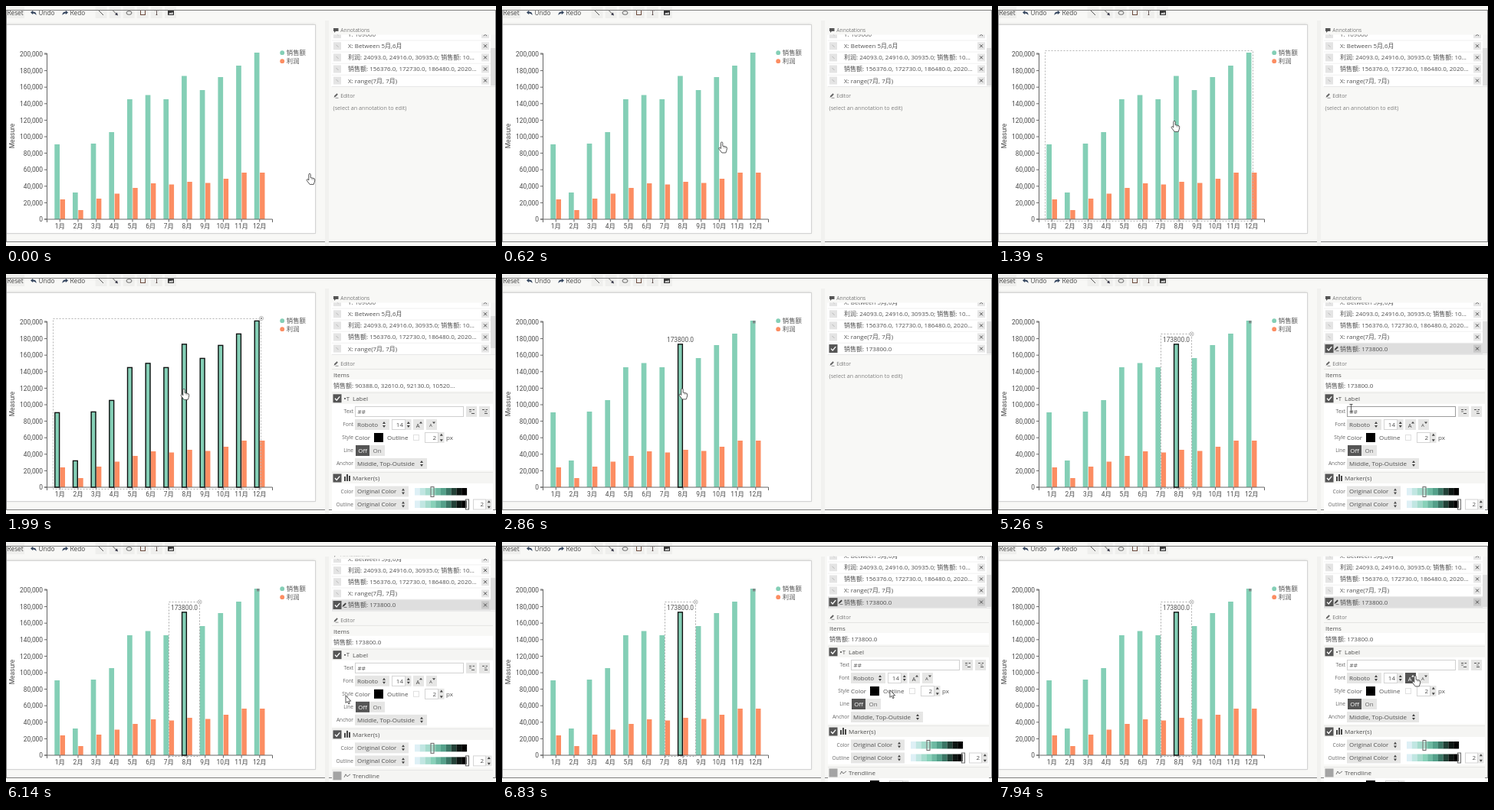
Write an HTML page with a canvas that moves like this. It is 639 by 314 pixels and loops after 8 s.

```html
<!DOCTYPE html>
<html lang="zh">
<head>
<meta charset="utf-8">
<title>Chart annotation</title>
<style>
html, body { margin: 0; width: 100%; height: 100%; overflow: hidden; background: #f8f8f6; }
canvas { display: block; width: 639px; height: 314px; }
</style>
</head>
<body>
<canvas id="stage"></canvas>
<script>
const W = 639, H = 314, LOOP = 8000;
const canvas = document.getElementById('stage');
const dpr = window.devicePixelRatio || 1;
canvas.width = W * dpr;
canvas.height = H * dpr;
const c = canvas.getContext('2d');

const UI = '"Open Sans", "Noto Sans CJK SC", "Noto Sans CJK", sans-serif';
const PLOT = 'Roboto, "Noto Sans CJK SC", "Noto Sans CJK", sans-serif';
const TEAL = '#84cfb6', ORANGE = '#fc8d62', DARK = '#555', BG = '#f8f8f6', BUTTON = '#e6e6e5';

// Bar tops in pixels, one per month
const salesTop = [181, 244, 180, 165, 122, 116.5, 122, 91.5, 110, 93, 78, 61];
const profitTop = [253, 267, 252, 245.5, 238, 232, 233.5, 230, 231.5, 226, 218, 218];
const BASE = 279, STEP = 23.68;

const rows = ['Y: 109000', 'X: Between 5月,6月', '利润: 24093.0, 24916.0, 30935.0; 销售额: 10...',
  '销售额: 156376.0, 172730.0, 186480.0, 2020...', 'X: range(7月, 7月)', '销售额: 173800.0'];

// Pointer path: time, x, y
const path = [[0, 396, 219], [130, 396, 219], [900, 240, 160], [970, 240, 160], [1390, 230, 150],
  [1660, 232, 150], [2650, 232, 150], [2860, 235, 149.5], [3260, 235, 149.5], [3800, 588, 84],
  [4030, 572.5, 99.5], [4490, 572.5, 99.5], [5260, 460.5, 175], [5390, 460.5, 175], [6140, 443, 201],
  [6210, 443, 201], [6970, 512, 193], [7040, 512, 193], [7390, 521, 176], [7590, 521, 176],
  [7940, 544, 174.5], [LOOP, 544, 174.5]];

const clamp = v => Math.max(0, Math.min(1, v));
const smooth = v => v * v * (3 - 2 * v);
const between = (t, a, b) => t >= a && t < b;

function pointer(t) {
  let i = 1;
  while (i < path.length - 1 && t >= path[i][0]) i++;
  const [t0, x0, y0] = path[i - 1], [t1, x1, y1] = path[i];
  const k = smooth(clamp((t - t0) / (t1 - t0)));
  return { x: x0 + (x1 - x0) * k, y: y0 + (y1 - y0) * k };
}

function rect(x, y, w, h, fill, stroke) {
  if (fill) { c.fillStyle = fill; c.fillRect(x, y, w, h); }
  if (stroke) {
    c.strokeStyle = stroke;
    c.lineWidth = 1;
    c.strokeRect(x + .5, y + .5, w - 1, h - 1);
  }
}

function text(s, x, y, size = 8, color = '#505050', align = 'left', font = UI) {
  c.font = size + 'px ' + font;
  c.fillStyle = color;
  c.textAlign = align;
  c.fillText(s, x, y + size * .37);
}

function line(points, color = '#444', width = 1) {
  c.beginPath();
  for (let i = 0; i < points.length; i += 2) c.lineTo(points[i], points[i + 1]);
  c.strokeStyle = color;
  c.lineWidth = width;
  c.stroke();
}

function dot(x, y, r, fill, stroke) {
  c.beginPath();
  c.arc(x, y, r, 0, 7);
  if (fill) { c.fillStyle = fill; c.fill(); }
  if (stroke) { c.strokeStyle = stroke; c.lineWidth = .8; c.stroke(); }
}

function shape(d, fill, stroke, width = 1) {
  const p = new Path2D(d);
  if (fill) { c.fillStyle = fill; c.fill(p); }
  if (stroke) { c.strokeStyle = stroke; c.lineWidth = width; c.stroke(p); }
}

function at(x, y, draw) {
  c.save();
  c.translate(x, y);
  draw();
  c.restore();
}

function cross(x, y, r, color, width = 1) {
  line([x - r, y - r, x + r, y + r], color, width);
  line([x - r, y + r, x + r, y - r], color, width);
}

function dashed(x, y, w, h, color) {
  c.setLineDash([2, 2]);
  rect(x, y, w, h, null, color);
  c.setLineDash([]);
}

function closeMark(x, y) {
  dot(x, y, 2.6, '#fff', '#aaa');
  cross(x, y, 1, '#777', .8);
}

function toolbar() {
  rect(0, 1, 24, 15, '#efefed');
  text('Reset', 1.5, 8.7, 8.2, '#444');
  text('Undo', 42.5, 8.7, 8.2, '#444');
  text('Redo', 83.5, 8.7, 8.2, '#444');
  const arrow = 'M0 3.5L3.2 .8V2.6Q7.5 2.6 7.6 7Q6 4.4 3.2 4.4V6.2Z';
  at(32, 5, () => shape(arrow, '#34455e'));
  at(81, 5, () => { c.scale(-1, 1); shape(arrow, '#34455e'); });
  for (let i = 0; i < 6; i++) rect(116.5 + i * 18.1, 1, 15, 15, '#efefed');
  line([121, 6, 127, 12], '#444', .9);
  line([139, 5.5, 144, 10.5], '#444', .9);
  shape('M146 12.5L142 11.2L144.8 8.4Z', '#334');
  c.beginPath();
  c.ellipse(160.5, 9, 3.5, 2.3, 0, 0, 7);
  c.strokeStyle = '#555';
  c.stroke();
  rect(175, 5, 7, 7, null, '#6b4a3c');
  text('T', 196.5, 8.8, 8, '#433', 'center', '"Noto Serif", serif');
  rect(211, 5, 8, 7, '#333');
  shape('M212 11L214 8.5L215.5 9.8L217 7.5L218 11Z', '#ddd');
}

function axes() {
  const ink = '#666';
  line([50, 62, 53.5, 62, 53.5, BASE, 50, BASE], ink);
  line([53.5, 283, 53.5, BASE, 347.5, BASE, 347.5, 283], ink);
  for (let i = 0; i <= 10; i++) {
    const y = BASE - i * 21.6;
    line([50, y, 53.5, y], ink);
    text((i * 20000).toLocaleString('en-US'), 48, y, 8.4, '#4a4a4a', 'right', PLOT);
  }
  for (let i = 0; i < 12; i++) {
    const x = 70.3 + i * STEP;
    line([x, BASE, x, 282.5], ink);
    text(i + 1 + '月', x, 287.5, 8.4, '#4a4a4a', 'center', PLOT);
  }
  at(8, 170, () => {
    c.rotate(-Math.PI / 2);
    text('Measure', 0, 0, 8.4, '#4a4a4a', 'center', PLOT);
  });
}

function chart(s) {
  c.save();
  c.shadowColor = 'rgba(0,0,0,.18)';
  c.shadowBlur = 3 * dpr;
  rect(-2, 24, 405, 273, '#fff');
  c.restore();
  rect(-2, 24, 406, 274, null, '#d4d4d4');
  for (let i = 0; i < 12; i++) {
    const x = 63.3 + i * STEP;
    rect(x, salesTop[i], 6.7, BASE - salesTop[i], TEAL);
    rect(x + 7.3, profitTop[i], 6.4, BASE - profitTop[i], ORANGE);
  }
  axes();
  for (let i = 0; i < 12; i++) {
    if (!s.series && !(s.single && i === 7)) continue;
    c.strokeStyle = '#111';
    c.lineWidth = 1.4;
    c.strokeRect(63.8 + i * STEP, salesTop[i] + .4, 5.8, BASE - salesTop[i] - .4);
  }
  dot(360.2, 61.2, 2.9, TEAL);
  dot(360.2, 72.2, 2.9, ORANGE);
  text('销售额', 365.8, 61.2, 8.4, '#555', 'left', PLOT);
  text('利润', 365.8, 72.2, 8.4, '#555', 'left', PLOT);

  if (s.hover || s.series) dashed(61, 58, 272, 224, '#b4b4b4');
  if (s.series) closeMark(333, 58);
  if (s.single) {
    rect(327, 61, 3.5, 3.5, '#7c8a88');
    text('173800.0', 232.5, 85.5, 8.4, '#555', 'center', PLOT);
  }
  if (s.boxed) {
    dashed(212, 78, 41, 203, '#aaa');
    closeMark(252.5, 78.5);
  }
}

function check(x, y, on = true) {
  rect(x - .5, y - .5, 11, 11, on ? DARK : '#a4a4a4');
  if (on) line([x + 2, y + 5, x + 4.2, y + 7.4, x + 8.2, y + 2.6], '#fff', 1.3);
}

function pencil(x, y, color) {
  shape(`M${x} ${y + 5}L${x + 1} ${y + 2.5}L${x + 4} ${y - .5}L${x + 5.4} ${y + .9}L${x + 2.4} ${y + 4}Z`, color);
  line([x + 2, y + 5.5, x + 6, y + 5.5], color, .7);
}

function list(s) {
  rect(427, 29, 6.5, 4, '#555');
  shape('M428 32.5V35L430.5 32.5Z', '#555');
  text('Annotations', 436.3, 31.4, 6.7, '#777');
  c.save();
  c.beginPath();
  c.rect(424, 37.5, 214, 67.5);
  c.clip();
  rect(424, 37, 209, 69, '#fff');
  rows.forEach((label, i) => {
    const y = 37.2 + (i - (s.single ? 1 : 0)) * 15.1, active = s.boxed && i === 5;
    if (active) rect(425, y - 7, 207, 15, s.rowHover ? '#cfcfcf' : '#dedede');
    line([425, y + 7.8, 632, y + 7.8], '#f0f0f0');
    if (i === 5) check(427, y - 5);
    else {
      rect(427, y - 5, 10, 10, '#e4e4e4');
      line([430.5, y - 1.5, 433.5, y + 1.5], '#aaa', .8);
    }
    if (active) pencil(438.5, y - 2.5, '#444');
    text(label, 446, y);
    rect(620, y - 5, 10, 10, active ? '#c8c8c8' : '#e6e6e6');
    cross(625, y, 2, '#4a4a4a', .95);
  });
  rect(632, 37, 6, 69, '#f5f5f4');
  if (s.single) rect(632, 62, 6, 42, '#dedede');
  else rect(632, 55, 6, s.series ? 42 : 49, '#dedede');
  c.restore();
  line([425, 105.5, 638, 105.5], '#e8e8e8');
}

function spin(x, y, gap = 1) {
  shape(`M${x - 2} ${y - gap}h4l-2 -3zM${x - 2} ${y + gap}h4l-2 3z`, '#444');
}

function select(label, x, y, w) {
  rect(x, y - 7, w, 14, BUTTON);
  text(label, x + 3, y);
  spin(x + w - 7, y);
}

function number(v, x, y, w, gap = 2.3) {
  rect(x, y - 7, w, 14, '#fff', '#d4d4d4');
  text(v, x + w - 3, y, 8, '#505050', 'right');
  rect(x + w, y - 7, 7.5, 14, BUTTON);
  spin(x + w + 3.8, y, gap);
}

const caption = (s, y) => text(s, 453, y, 6.6, '#666', 'right');

function head(label, y, on) {
  rect(425, y - 8, 210, 15, '#f5f5f3');
  line([425, y - 7.5, 635, y - 7.5], '#e6e6e4');
  check(427, y - 5, on);
  text(label, 452, y);
}

const ramp = [[0, 222, 240, 246], [.35, 132, 207, 182], [.6, 74, 150, 128], [.85, 18, 30, 26], [1, 0, 0, 0]];

function shade(k) {
  let i = 1;
  while (k > ramp[i][0]) i++;
  const a = ramp[i - 1], b = ramp[i], f = (k - a[0]) / (b[0] - a[0]);
  return 'rgb(' + [1, 2, 3].map(j => Math.round(a[j] + (b[j] - a[j]) * f)) + ')';
}

function slider(y, knob) {
  for (let i = 0; i < 10; i++) rect(533 + i * 6.8, y - 5, 6.9, 9.5, shade(i / 9));
  rect(knob, y - 7, 5, 14, 'rgba(255,255,255,.35)', '#666');
}

function fontButton(x, up, dark) {
  rect(x, 190, 14, 14, dark ? DARK : BUTTON);
  const ink = dark ? '#fff' : '#444';
  text('A', x + 6, 198, up ? 7.5 : 6, ink, 'center');
  shape(up ? `M${x + 8} 195.5h4l-2 -2.5z` : `M${x + 8} 193.5h4l-2 2.5z`, ink);
}

function decimalButton(x, indent) {
  rect(x, 173, 14, 14, BUTTON);
  line([x + 4, 177.5, x + 7, 177.5], '#555');
  line([x + 8.5, 177.5, x + 11, 177.5], '#555');
  line([x + 4 + indent, 180, x + 7 + indent, 180], '#777');
  line([x + 7, 182.5, x + 11, 182.5], '#555');
}

function editor(s) {
  pencil(427.5, 114.8, '#666');
  text('Editor', 436.3, 117.8, 6.7, '#777');
  if (!s.editing) {
    text('(select an annotation to edit)', 426.5, 133.8, 7.2, '#808080');
    return;
  }
  rect(425, 124, 210, 240, '#fff');
  rect(425, 124, 210, 14, BG);
  line([425, 124.5, 635, 124.5], '#e4e4e2');
  text('Items', 427, 131.7);
  text(s.series ? '销售额: 90388.0, 32610.0, 92130.0, 10520...' : rows[5], 427, 145.7);

  rect(425, 153, 210, 3, BG);
  head('Label', 162.8, true);
  dot(442, 163, 1, '#444');
  text('T', 444, 163, 7, '#444');
  caption('Text', 180);
  rect(455, 173, 142, 14, '#fff', s.typing ? '#9c9c9c' : '#d0d0d0');
  text('##', 458.5, 180);
  decimalButton(600, 0);
  decimalButton(617, 3);

  caption('Font', 197);
  select('Roboto', 455, 197, 45);
  number('14', 503, 197, 18, 1);
  fontButton(531, true, s.grow);
  fontButton(548, false, false);

  caption('Style', 214);
  text('Color', 455, 214);
  rect(480, 208, 12, 12, '#000');
  text('Outline', 497, 214);
  rect(531, 210, 8, 8, '#fff', '#e0e0e0');
  number('2', 546, 214, 18);
  text('px', 574, 214);

  caption('Line', 231);
  rect(456, 224, 18, 14, DARK);
  rect(474, 224, 20, 14, BUTTON);
  text('Off', 465, 231, 8, '#fff', 'center');
  text('On', 484, 231, 8, '#666', 'center');
  caption('Anchor', 248);
  select('Middle, Top-Outside', 455, 248, 94);

  rect(425, 257, 210, 3, BG);
  head('Marker(s)', 267, true);
  rect(441, 265, 2, 6, '#444');
  rect(444, 262, 2, 9, '#444');
  rect(447, 264, 2, 7, '#444');
  caption('Color', 284.5);
  select('Original Color', 455, 284.5, 70);
  slider(285, 553.5);
  caption('Outline', 301.5);
  select('Original Color', 455, 301.5, 70);
  slider(301.5, 599);
  number('2', 609, 301.5, 17);

  rect(425, 310, 210, 3, BG);
  head('Trendline', 321, false);
  line([441, 323, 443, 319, 445, 322, 449, 319], '#666', .9);
  caption('Line', 338);
  text('Color', 455, 338);
  rect(480, 331, 12, 12, '#000');
  number('2', 505, 338, 18);
}

function panel(s) {
  rect(416, 19, 5, 295, '#f1f1ef');
  c.save();
  c.beginPath();
  c.rect(421, 18.5, 218, 296);
  c.clip();
  c.translate(0, -s.scroll);
  list(s);
  editor(s);
  c.restore();
}

function frameLines() {
  rect(0, 5, 639, 304, null, '#808080');
}

const cursors = {
  hand() {
    shape('M-1.2 9V1.6Q-1.2 .4 0 .4Q1.2 .4 1.2 1.6V5.6L5 6.4Q7 6.8 6.8 8.6L6.2 11.6L5.2 14.4H.2' +
      'L-3.4 9.8Q-4.4 8.2 -3.2 7.6Q-2.3 7.4 -1.2 9Z', '#fff', '#444', .9);
    line([3, 6.2, 3, 8.6], '#777', .6);
    line([5, 6.6, 5, 8.8], '#777', .6);
  },
  arrow() {
    shape('M0 0V9.6L2.2 7.6L3.8 11L5.3 10.3L3.8 7.1H6.8Z', '#fff', '#444', .9);
  },
  beam() {
    line([0, -4.5, 0, 5], '#444', .9);
    line([-2, -4.5, 2, -4.5], '#444', .9);
    line([-2, 5, 2, 5], '#444', .9);
  }
};

function cursorKind(t, p) {
  if (t < 4490) return 'hand';
  if (t < 5390) return p.y < 105 ? 'hand' : p.y > 171 ? 'beam' : 'arrow';
  if (t < 6210) return p.x > 455 && p.y < 187 ? 'beam' : 'arrow';
  return t > 7590 && p.x > 530 ? 'hand' : 'arrow';
}

function draw(t) {
  const p = pointer(t), kind = cursorKind(t, p);
  const s = {
    hover: between(t, 640, 1050) || between(t, 1180, 1925),
    series: between(t, 1925, 2700),
    single: t >= 2700,
    boxed: t >= 4000,
    rowHover: between(t, 4000, 5390) && kind === 'hand',
    typing: kind === 'beam',
    grow: t > 7590 && p.x > 530,
    scroll: 19 * (1 - (1 - clamp((t - 5980) / 400)) ** 3.1)
  };
  s.editing = s.series || t >= 4165;
  c.setTransform(dpr, 0, 0, dpr, 0, 0);
  rect(0, 0, W, H, BG);
  toolbar();
  chart(s);
  frameLines();
  panel(s);
  at(p.x, p.y, cursors[kind]);
}

const start = performance.now();
function tick() {
  draw((performance.now() - start) % LOOP);
  requestAnimationFrame(tick);
}
tick();
</script>
</body>
</html>
```
